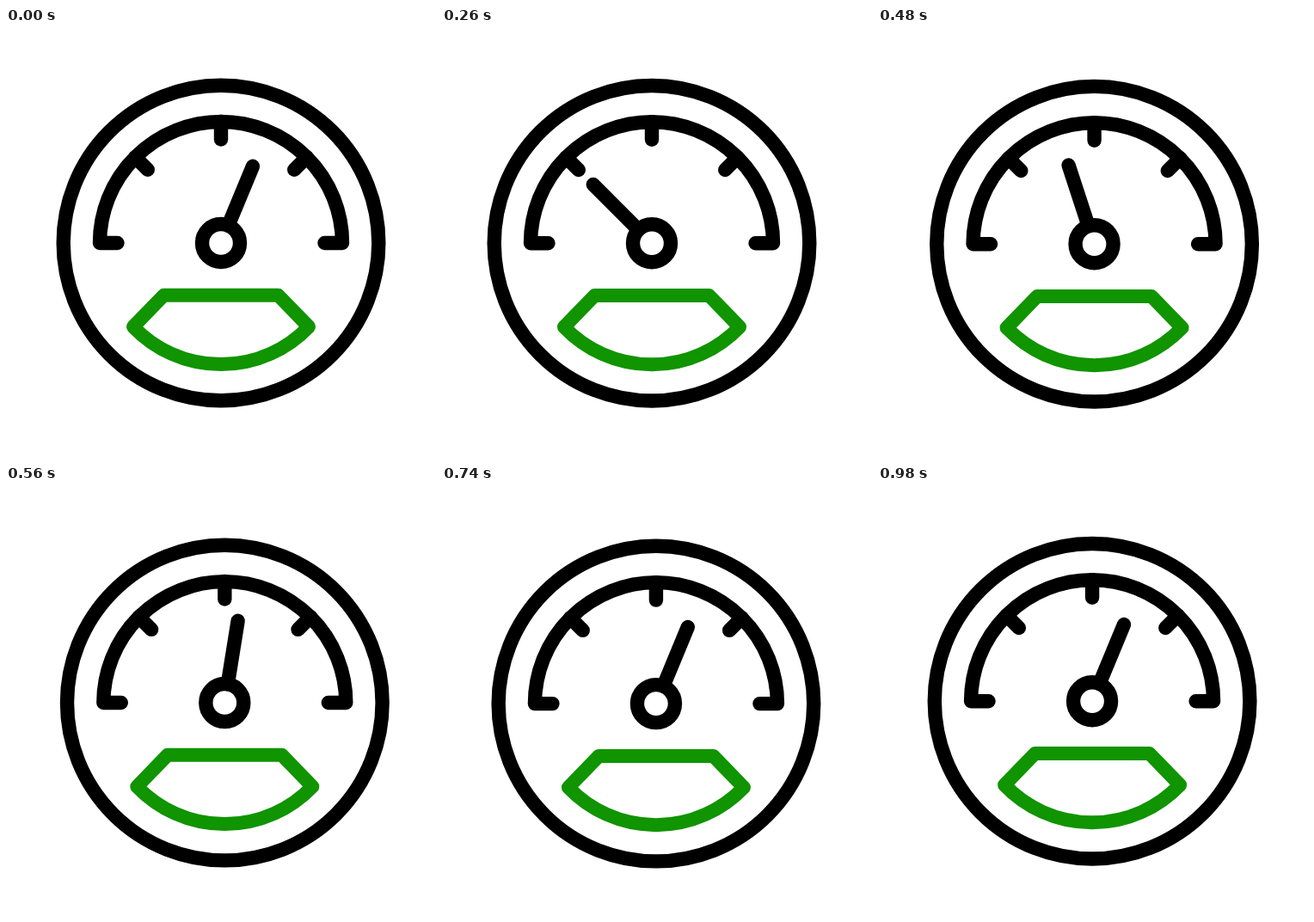
Animation of 500 by 500 pixels, one loop 1 s. Source, as an HTML page:

```html
<!DOCTYPE html>
<html lang="en">
<head>
<meta charset="utf-8">
<title>Shaking gauge</title>
<style>
  html, body { margin: 0; width: 100%; height: 100%; overflow: hidden; background: #fff; }
  svg { display: block; width: 100%; height: 100%; }
</style>
</head>
<body>
<svg viewBox="0 0 500 500" fill="none" stroke="#000" stroke-width="16.4" stroke-linecap="round" stroke-linejoin="round">
  <!-- everything is drawn around the pivot -->
  <g id="gauge">
    <circle r="183.300"/>
    <path d="M-120.500 0H-141A141 141 0 0 1 141 0H120.500"/>
    <g id="tick"><path d="M0-141V-120.500"/></g>
    <use href="#tick" transform="rotate(-45)"/>
    <use href="#tick" transform="rotate(45)"/>
    <circle r="22"/>
    <path id="needle" d="M0-22V-96.500"/>
    <path stroke="#109400" stroke-width="16" d="M-66.500 60.800H66.500L102 97.400A141 141 0 0 1-102 97.400Z"/>
  </g>
</svg>
<script>
const LOOP = 1000, STEP = 20, REST = 22.5;
const gauge = document.getElementById("gauge");
const needle = document.getElementById("needle");

const linear = u => u;
const smooth = u => u * u * (3 - 2 * u);

// Moves between [ms, value] turning points.
function tween(points, t, ease) {
  const i = points.findIndex(([end]) => end > t);
  const [t0, v0] = points[i - 1], [t1, v1] = points[i];
  return v0 + (v1 - v0) * ease((t - t0) / (t1 - t0));
}

const shakeX = [[0, 0], [60, 1], [260, -6], [580, 5], [870, -6], [LOOP, 0]];
const shakeY = [[0, 0], [140, -2], [380, 2.5], [480, 1.2], [700, 3.6], [LOOP, 0]];
const swing = [[0, REST], [230, -45], [350, -45], [670, 29.5], [740, REST], [LOOP, REST]];

const start = performance.now();

function draw(now) {
  const time = Math.max(0, now - start) % LOOP;
  const t = Math.floor(time / STEP) * STEP;
  const x = 250 + tween(shakeX, t, linear), y = 250 + tween(shakeY, t, linear);
  gauge.setAttribute("transform", `translate(${x} ${y})`);
  needle.setAttribute("transform", `rotate(${tween(swing, t, smooth)})`);
  requestAnimationFrame(draw);
}
draw(start);
</script>
</body>
</html>
```
